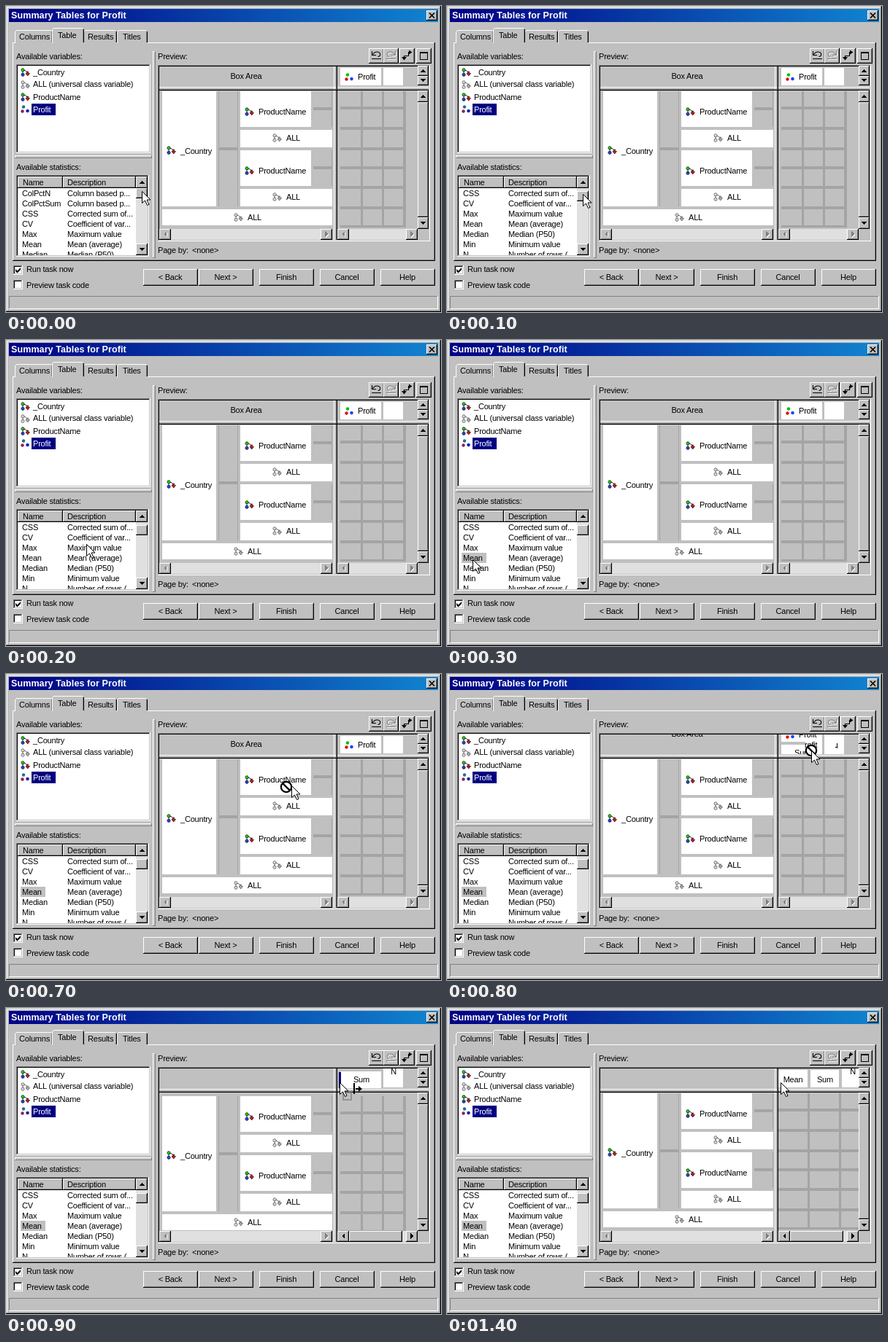
Animation, 596 px wide and 420 px high, one loop 3400 ms. Source, as an HTML page:

```html
<!DOCTYPE html>
<html lang="en">
<head>
<meta charset="utf-8">
<title>Summary Tables</title>
<style>
html, body { margin: 0; width: 100%; height: 100%; overflow: hidden; background: #c0c0c0; }
svg { display: block; }
text { font: 11px "Liberation Sans", Arial, sans-serif; letter-spacing: -0.2px; white-space: pre; }
.title { font-weight: bold; font-size: 12.5px; letter-spacing: 0.1px; }
rect, .crisp { shape-rendering: crispEdges; }
</style>
</head>
<body>
<svg id="stage" width="596" height="420" viewBox="0 0 596 420">
  <defs>
    <linearGradient id="bar"><stop stop-color="#000084"/><stop offset="1" stop-color="#1084d0"/></linearGradient>
    <clipPath id="listClip"><rect x="16" y="250" width="162" height="92"/></clipPath>
    <clipPath id="headClip"><rect x="210" y="83" width="354" height="27"/></clipPath>
    <clipPath id="bodyClip"><rect x="210" y="116" width="354" height="190"/></clipPath>
  </defs>
  <g id="base"></g>
  <g id="live"></g>
</svg>
<script>
const FACE = '#c0c0c0', SHADE = '#808080', GRID = '#a4a4a4', TRACK = '#e0e0e0', NAVY = '#000080';
const LOOP = 3400;

const rect = (x, y, w, h, fill) => `<rect x="${x}" y="${y}" width="${w}" height="${h}" fill="${fill}"/>`;
const path = (d, fill, extra = '') => `<path d="${d}" fill="${fill}" ${extra}/>`;
const dot = (x, y, r, fill, extra = '') => `<circle cx="${x}" cy="${y}" r="${r}" fill="${fill}" ${extra}/>`;
const text = (x, y, s, fill = '#000', extra = '') =>
  `<text x="${x}" y="${y}" fill="${fill}" ${extra}>${s.replace(/</g, '&lt;')}</text>`;
const mid = (x, y, s) => text(x, y, s, '#000', 'text-anchor="middle"');
const move = (x, y, s) => `<g transform="translate(${x} ${y})">${s}</g>`;
const clip = (id, s) => `<g clip-path="url(#${id})">${s}</g>`;

// Two-colour one pixel frame
const edge = (x, y, w, h, tl, br) =>
  rect(x, y, w, 1, tl) + rect(x, y, 1, h, tl) + rect(x, y + h - 1, w, 1, br) + rect(x + w - 1, y, 1, h, br);
const raised = (x, y, w, h) =>
  rect(x, y, w, h, FACE) + edge(x + 1, y + 1, w - 2, h - 2, FACE, SHADE) + edge(x, y, w, h, '#fff', '#000');
const sunken = (x, y, w, h, fill = '#fff') =>
  rect(x, y, w, h, fill) + edge(x + 1, y + 1, w - 2, h - 2, '#000', FACE) + edge(x, y, w, h, SHADE, '#fff');

const ARROWS = {
  up: 'M-4 2L0 -2L4 2Z', down: 'M-4 -2L0 2L4 -2Z',
  left: 'M2 -4L-2 0L2 4Z', right: 'M-2 -4L2 0L-2 4Z'
};
function arrowButton(x, y, w, h, dir, on = true) {
  const shape = fill => path(ARROWS[dir], fill, 'class="crisp"');
  const cx = x + Math.floor(w / 2), cy = y + Math.floor(h / 2);
  return raised(x, y, w, h) + (on ? '' : move(cx + 1, cy + 1, shape('#fff'))) + move(cx, cy, shape(on ? '#000' : SHADE));
}

// Variable icons
function classIcon(x, y, grey) {
  const [a, b, c, line] = grey ? ['#d8d8d8', '#d8d8d8', '#b0b0b0', '#606060'] : ['#00e000', '#2040ff', '#f00000', '#202020'];
  const rim = `stroke="${line}" stroke-width=".8"`;
  return move(x, y,
    path('M3 3V10M3 3.5H6.5L9.5 7', 'none', `stroke="${line}"`) + dot(3, 2.8, 2.1, a, rim) + dot(3, 9.3, 2.1, b, rim) +
    path('M7 7.5H8.5V5H10.5V7.5H12.5L9.7 11Z', c, rim));
}
const numberIcon = (x, y, a, b, c) => move(x, y, dot(4, 2.5, 2.2, a) + dot(2.5, 8.5, 2.2, b) + dot(9.5, 8, 2.3, c));
const profitHead = y => numberIcon(464, y, '#00c000', '#e01010', '#2040ff');

function tab(x, y, w, label, tx, ty) {
  return rect(x, y, w, 51 - y, FACE) + rect(x, y + 2, 1, 49 - y, '#fff') + rect(x + 2, y, w - 4, 1, '#fff') +
    rect(x + 1, y + 1, 1, 1, '#fff') + rect(x + w - 2, y + 2, 1, 48 - y, SHADE) + rect(x + w - 1, y + 2, 1, 48 - y, '#000') +
    text(tx, ty, label);
}
const button = (x, label) => raised(x, 361, 75, 23) + mid(x + 37, 376, label);

function toolbar() {
  const line = (d, c) => path(d, 'none', `stroke="${c}" stroke-width="1.1"`);
  const undo = c => line('M4.5 4V9.5H10M5 9Q8 4.5 12 5Q16.5 6 15.5 9.5Q15 11.5 12.5 11.5', c) + rect(4, 14, 13, 1, c);
  const redo = c => move(21, 0, `<g transform="scale(-1 1)">${undo(c)}</g>`);
  return [497, 517, 539, 562].map(x => raised(x, 58, 21, 21)).join('') +
    move(497, 58, undo('#000')) + move(518, 59, redo('#fff')) + move(517, 58, redo(SHADE)) +
    move(539, 58, line('M6.5 15V10.5H12.5V5.5H15', '#000') +
      path('M3 12H10L6.5 16.5ZM13 2.5L17.5 5.5L13 8.5Z', '#000')) +
    move(562, 58, rect(5, 5, 11, 11, '#000') + rect(6, 7, 9, 8, FACE));
}

function drawBase() {
  let s = rect(0, 0, 596, 420, FACE) + edge(0, 0, 596, 420, FACE, '#000') + edge(1, 1, 594, 418, '#fff', SHADE);
  s += rect(4, 4, 588, 18, 'url(#bar)') + text(7, 17, 'Summary Tables for Profit', '#fff', 'class="title"');
  s += raised(576, 6, 15, 14) + path('M580 9.5L587 16.5M587 9.5L580 16.5', 'none', 'stroke="#000" stroke-width="1.7"');

  s += edge(9, 50, 579, 300, '#fff', '#000') + edge(10, 51, 577, 298, FACE, SHADE);
  s += tab(12, 33, 52, 'Columns', 18, 46) + tab(106, 33, 46, 'Results', 112, 46) + tab(152, 33, 42, 'Titles', 160, 46);
  s += tab(63, 30, 44, 'Table', 71, 44);

  s += text(14, 73, 'Available variables:') + sunken(14, 80, 184, 122);
  s += classIcon(20, 85) + text(37, 95, '_Country');
  s += classIcon(20, 102, true) + text(37, 111, 'ALL (universal class variable)');
  s += classIcon(20, 119) + text(37, 129, 'ProductName');
  s += numberIcon(20, 136, '#207090', '#902050', '#2020b0') + rect(35, 134, 33, 16, NAVY) + text(37, 146, 'Profit', '#fff');

  s += edge(12, 205, 188, 4, '#fff', SHADE) + edge(201, 62, 4, 284, '#fff', SHADE);
  s += text(14, 225, 'Available statistics:') + sunken(14, 232, 182, 112);
  s += raised(16, 234, 62, 16) + raised(78, 234, 100, 16) + text(23, 246, 'Name') + text(84, 246, 'Description');

  s += text(208, 73, 'Preview:') + toolbar() + sunken(208, 81, 373, 242, FACE);
  s += text(208, 339, 'Page by:') + text(255, 339, '<none>');

  s += sunken(10, 356, 13, 13) + path('M13 361V364L15.5 366.5L20 362V359L15.5 363.5Z', '#000') + text(28, 365, 'Run task now');
  s += sunken(10, 376, 13, 13) + text(28, 387, 'Preview task code');
  s += button(188, '< Back') + button(264, 'Next >') + button(347, 'Finish') + button(430, 'Cancel') + button(513, 'Help');
  return s + edge(4, 398, 588, 18, SHADE, '#fff');
}

const STATS = [
  ['ColPctN', 'Column based p...'], ['ColPctSum', 'Column based p...'], ['CSS', 'Corrected sum of...'],
  ['CV', 'Coefficient of var...'], ['Max', 'Maximum value'], ['Mean', 'Mean (average)'],
  ['Median', 'Median (P50)'], ['Min', 'Minimum value'], ['N', 'Number of rows (...']
];
function statList(first, picked) {
  const rows = STATS.slice(first, first + 7).map(([name, note], i) => {
    const y = 261 + 14 * i;
    const mark = picked && name === 'Mean' ? rect(20, y - 11, 34, 14, FACE) : '';
    return mark + text(22, y, name) + text(84, y, note);
  }).join('');
  return clip('listClip', rows) + rect(178, 234, 16, 108, TRACK) +
    arrowButton(178, 234, 16, 16, 'up') + arrowButton(178, 326, 16, 16, 'down') +
    raised(178, first ? 254 : 250, 16, 14);
}

const ROWS = [[117, 21], [142, 24], [170, 24], [198, 22], [224, 23], [251, 24], [279, 22]];
const COLS = [[458, 28], [489, 26], [518, 26]];
const WIDE_COLS = [[454, 40], [497, 40], [540, 24]];

function rowHeads() {
  const product = y => rect(321, y, 97, 49, '#fff') + classIcon(327, y + 22) + text(346, y + 32, 'ProductName') +
    rect(421, y, 26, 49, GRID) + rect(421, y, 25, 22, FACE) + rect(421, y + 26, 25, 23, FACE);
  const all = (x, y, w, h, ix) => rect(x, y, w, h, '#fff') + classIcon(ix, y + 5, true) + text(ix + 19, y + 15, 'ALL');
  return rect(214, 117, 74, 158, '#fff') + classIcon(220, 192) + text(239, 203, '_Country') +
    rect(291, 117, 27, 158, GRID) + rect(292, 117, 25, 77, FACE) + rect(292, 198, 25, 77, FACE) +
    product(117) + all(321, 170, 126, 24, 365) + product(198) + all(321, 251, 126, 24, 365) + all(214, 279, 233, 22, 312);
}
function dataGrid(cols) {
  const right = cols[2][0] + cols[2][1];
  let s = rect(cols[0][0], 117, Math.min(564, right + 4) - cols[0][0], 187, GRID);
  for (const [y, h] of ROWS) for (const [x, w] of cols) s += rect(x, y, w, h, FACE);
  return s;
}

const HEADS = {
  start: () => mid(329, 100, 'Box Area') +
    rect(458, 85, 56, 24, '#fff') + profitHead(92) + text(482, 101, 'Profit') + rect(517, 85, 27, 24, '#fff'),
  scroll: () => mid(329, 86, 'Box Area') +
    rect(458, 82, 56, 28, '#fff') + profitHead(78) + text(482, 87, 'Profit') +
    rect(458, 93, 33, 4, FACE) + text(490, 101, 'rofit') + text(476, 112, 'Sum') +
    rect(517, 82, 27, 28, '#fff') + rect(534, 95, 1, 7, '#000') + rect(532, 100, 2, 1, '#000'),
  drop: () => rect(459, 87, 55, 23, '#fff') + rect(456, 88, 3, 22, NAVY) + mid(487, 102, 'Sum') +
    rect(517, 82, 27, 27, '#fff') + mid(531, 91, 'N'),
  done: () => rect(454, 85, 40, 24, '#fff') + mid(474, 102, 'Mean') + rect(498, 85, 39, 24, '#fff') + mid(518, 102, 'Sum') +
    rect(541, 82, 24, 27, '#fff') + mid(556, 91, 'N')
};

// Splitters between the four sunken panes
function splitters() {
  return rect(210, 110, 369, 6, FACE) + rect(448, 83, 6, 238, FACE) +
    rect(210, 111, 369, 1, '#fff') + rect(449, 83, 1, 238, '#fff') +
    rect(210, 114, 369, 1, SHADE) + rect(452, 83, 1, 238, SHADE) +
    rect(210, 115, 369, 1, '#000') + rect(453, 83, 1, 238, '#000') + rect(450, 112, 2, 2, FACE);
}

function preview(mode) {
  const wide = mode === 'drop' || mode === 'done';
  const body = rowHeads() + dataGrid(mode === 'done' ? WIDE_COLS : COLS);
  let s = clip('headClip', HEADS[mode]()) + clip('bodyClip', move(0, mode === 'drop' ? 4 : 0, body)) + splitters();
  s += arrowButton(564, 82, 15, 14, 'up') + arrowButton(564, 96, 15, 13, 'down');
  s += arrowButton(564, 116, 15, 16, 'up') + raised(564, 132, 15, 158) + arrowButton(564, 290, 15, 16, 'down');
  s += rect(210, 306, 237, 15, TRACK) + arrowButton(210, 306, 16, 15, 'left', false) + arrowButton(431, 306, 16, 15, 'right', false);
  s += rect(454, 306, 110, 15, TRACK) + arrowButton(454, 306, 16, 15, 'left', wide) + arrowButton(548, 306, 16, 15, 'right', wide);
  if (wide) s += raised(470, 306, 73, 15);
  return s + rect(564, 306, 15, 15, FACE);
}

const pointer = (x, y) =>
  move(x + .5, y + .5, path('M0 0V16L4 12.5L7 19L9.5 18L6.5 11.5H11.5Z', '#fff', 'stroke="#000"'));
const noEntry = (x, y) =>
  dot(x, y, 7.2, '#fff', 'stroke="#000" stroke-width="2.2"') +
  path(`M${x - 5} ${y - 5}L${x + 5} ${y + 5}`, 'none', 'stroke="#000" stroke-width="2.4"');
const dropMark = () =>
  `<rect x="462" y="116" width="11" height="10" fill="none" stroke="${SHADE}" stroke-width="2" opacity=".7"/>` +
  rect(476, 103, 2, 15, '#000') + rect(479, 110, 6, 2, '#000') + path('M483 107L488 111L483 115Z', '#000');

// start time, pointer place, first list row, Mean picked, preview state, sign place
const STEPS = [
  { at: 0, x: 186, y: 254, first: 0, mode: 'start' },
  { at: 100, x: 186, y: 258, first: 2, mode: 'start' },
  { at: 200, x: 110, y: 280, first: 2, mode: 'start' },
  { at: 300, x: 35, y: 301, first: 2, picked: true, mode: 'start' },
  { at: 500, x: 175, y: 251, first: 2, picked: true, mode: 'start', sign: [155, 257] },
  { at: 600, x: 283, y: 202, first: 2, picked: true, mode: 'start', sign: [270, 206] },
  { at: 700, x: 391, y: 153, first: 2, picked: true, mode: 'start', sign: [384, 155] },
  { at: 800, x: 499, y: 105, first: 2, picked: true, mode: 'scroll', sign: [499, 105] },
  { at: 900, x: 457, y: 102, first: 2, picked: true, mode: 'drop' },
  { at: 1400, x: 457, y: 102, first: 2, picked: true, mode: 'done' }
];

const live = document.getElementById('live');
let shown = null;
function render(time) {
  const step = STEPS.filter(s => s.at <= time).pop();
  if (step === shown) return;
  shown = step;
  live.innerHTML = statList(step.first, step.picked) + preview(step.mode) +
    (step.sign ? noEntry(...step.sign) : '') + (step.mode === 'drop' ? dropMark() : '') + pointer(step.x, step.y);
}

document.getElementById('base').innerHTML = drawBase();
const start = performance.now();
function tick() {
  render((performance.now() - start) % LOOP);
  requestAnimationFrame(tick);
}
tick();
</script>
</body>
</html>
```
